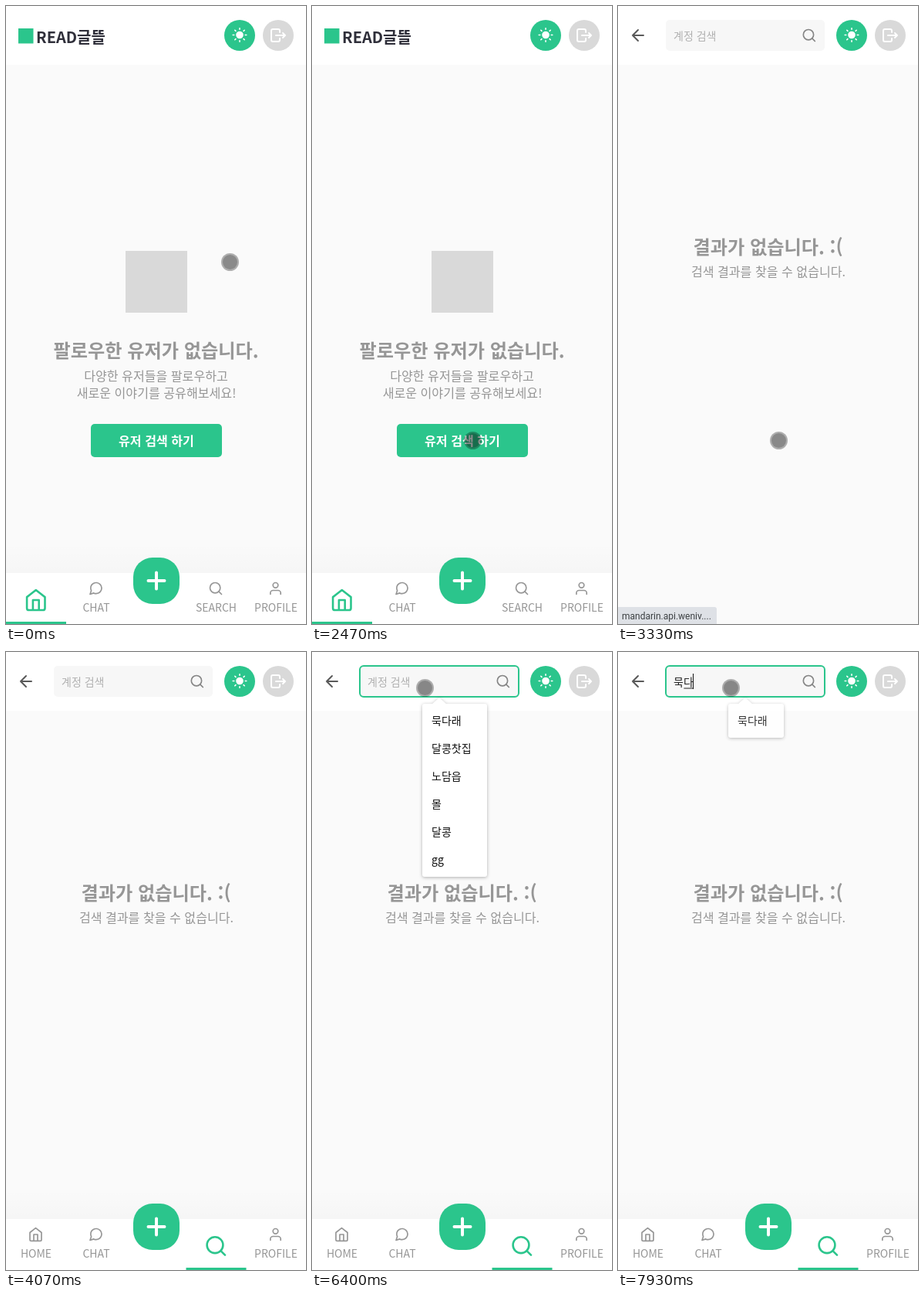
Write an HTML page that moves like this. It is 389 px wide and 800 px high and loops after 8 s.

```html
<!DOCTYPE html>
<html lang="ko">
<head>
<meta charset="utf-8">
<title>Account search</title>
<style>
  html, body { margin: 0; width: 100%; height: 100%; overflow: hidden; background: #fafafa; }
  svg { display: block; width: 100vw; height: 100vh; }
  text { font-family: "Noto Sans CJK KR", "Noto Sans KR", "Noto Sans CJK JP", "Noto Sans CJK", "Noto Sans", sans-serif; white-space: pre; }
  .mid { text-anchor: middle; }
  .icon { fill: none; stroke-width: 2; stroke-linecap: round; stroke-linejoin: round; }
  .title { font-size: 24.2px; font-weight: 700; fill: #969696; }
  .body { font-size: 16.1px; fill: #969696; }
  .label { font-size: 14px; fill: #969696; }
  .item { font-size: 14px; font-weight: 300; fill: #111; }
  .status { font: 12px Roboto, "Open Sans", sans-serif; fill: #3c4043; }
  .popup { filter: drop-shadow(0 1px 2px rgba(0, 0, 0, .3)); }
</style>
</head>
<body>
<svg id="stage" viewBox="0 0 389 800"></svg>
<script>
const LOOP = 8000;
const GREEN = '#2bc58c', GREY = '#969696', PALE = '#d9d9d9';

const paths = {
  home: '<path d="M3 9l9-7 9 7v11a2 2 0 0 1-2 2H5a2 2 0 0 1-2-2zM9 22V12h6v10"/>',
  chat: '<path d="M21 11.5a8.4 8.4 0 0 1-.9 3.8 8.5 8.5 0 0 1-7.6 4.7 8.4 8.4 0 0 1-3.8-.9L3 21l1.9-5.7a8.4 8.4 0 0 1-.9-3.8 8.5 8.5 0 0 1 4.7-7.6 8.4 8.4 0 0 1 3.8-.9h.5a8.5 8.5 0 0 1 8 8z"/>',
  search: '<circle cx="11" cy="11" r="8"/><path d="M21 21l-4.35-4.35"/>',
  user: '<path d="M20 21v-2a4 4 0 0 0-4-4H8a4 4 0 0 0-4 4v2"/><circle cx="12" cy="7" r="4"/>',
  back: '<path d="M19 12H5M12 19l-7-7 7-7"/>',
  exit: '<path d="M14 8V6a2 2 0 0 0-2-2H5a2 2 0 0 0-2 2v12a2 2 0 0 0 2 2h7a2 2 0 0 0 2-2v-2M9 12h12l-3-3m0 6l3-3"/>'
};

const group = (id, body, attrs = '') => `<g id="${id}" ${attrs}>${body}</g>`;
const rect = (x, y, w, h, fill, attrs = '') =>
  `<rect x="${x}" y="${y}" width="${w}" height="${h}" fill="${fill}" ${attrs}/>`;
const text = (x, y, cls, str, attrs = '') => `<text x="${x}" y="${y}" class="${cls}" ${attrs}>${str}</text>`;
// Icons are drawn in a 24-unit box centred on (x, y).
const icon = (name, x, y, scale, color) =>
  `<g class="icon" stroke="${color}" transform="translate(${x} ${y}) scale(${scale}) translate(-12 -12)">${paths[name]}</g>`;

const TABS = [['home', 'HOME', 39], ['chat', 'CHAT', 117], ['search', 'SEARCH', 272.5], ['user', 'PROFILE', 350]];

function tab([name, label, x], active) {
  if (!active) return icon(name, x - .5, 754, .833, GREY) + text(x, 784, 'label mid', label);
  return icon(name, x - .2, 769, 1.3, GREEN) + rect(x - 39, 797, 78, 3, GREEN);
}

const tabs = current => TABS.map(t => tab(t, t[0] === current)).join('');

const rays = [...Array(8).keys()].map(i =>
  `<path d="M0-7.2v-1.6" transform="rotate(${i * 45})"/>`).join('');

const headerButtons = `
  <circle cx="303" cy="38" r="20" fill="${GREEN}"/>
  <g transform="translate(303 37.5)" stroke="#fff" stroke-width="1.6" stroke-linecap="round">
    <circle r="4.8" fill="#fff" stroke="none"/>${rays}
  </g>
  <circle cx="353" cy="38" r="20" fill="${PALE}"/>` + icon('exit', 353, 38, 1, '#fff');

const homePage =
  rect(16, 29, 19.5, 19.5, GREEN) +
  text(39, 48, '', 'READ글뜰', 'font-size="20" font-weight="900" fill="#2f2f3a"') +
  rect(155, 317, 80, 80, PALE) +
  text(194.5, 455, 'title mid', '팔로우한 유저가 없습니다.') +
  text(194.5, 485, 'body mid', '다양한 유저들을 팔로우하고') +
  text(195, 507, 'body mid', '새로운 이야기를 공유해보세요!') +
  rect(110, 541, 170, 43, GREEN, 'rx="5"') +
  text(195, 569, 'mid', '유저 검색 하기', 'font-size="16.1" font-weight="700" fill="#fff"') +
  rect(110, 541, 170, 43, 'rgba(51,181,229,.4)', 'id="tap" rx="5"');

const searchPage =
  icon('back', 26, 38, 1, '#5a5a5a') +
  rect(62, 18, 206, 40, '#f7f7f7', 'rx="5"') +
  rect(62, 18, 206, 40, 'none', `id="focus" rx="5" stroke="${GREEN}" stroke-width="2"`) +
  text(72, 44, '', '계정 검색', 'id="hint" font-size="14" fill="#b0b0b0"') +
  text(72, 44, '', '', 'id="typed" font-size="14" fill="#222"') +
  rect(0, 46.5, 12, 1, '#222', 'id="underline"') +
  rect(0, 28, 1, 20, '#111', 'id="caret"') +
  icon('search', 247.8, 38, .833, '#858585') +
  text(194.5, 321, 'title mid', '결과가 없습니다. :(') +
  text(195, 350, 'body mid', '검색 결과를 찾을 수 없습니다.');

function popup(id, width, height, items) {
  const body = `<path d="M155 68l10-9 10 9z" fill="#fff"/>` + rect(143, 67, width, height, '#fff', 'rx="3"') +
    items.map((s, i) => text(155, 94 + i * 36, 'item', s)).join('');
  return group(id, body, 'class="popup"');
}

document.getElementById('stage').innerHTML = `
  <defs><linearGradient id="shade" x2="0" y2="1">
    <stop offset="0" stop-opacity="0"/><stop offset="1" stop-opacity=".018"/>
  </linearGradient></defs>` +
  rect(0, 0, 389, 800, '#fafafa') +
  rect(0, 0, 389, 76, '#fff') +
  group('homePage', homePage) +
  group('searchPage', searchPage) +
  headerButtons +
  group('nav',
    rect(0, 696, 389, 38, 'url(#shade)') + rect(0, 734, 389, 66, '#fff') +
    group('homeTabs', tabs('home')) + group('searchTabs', tabs('search')) +
    rect(165, 714, 60, 60, GREEN, 'rx="25"') +
    '<path d="M184.5 744h21M195 733.5v21" stroke="#fff" stroke-width="4" stroke-linecap="round"/>') +
  group('status',
    '<path d="M0 778h125q3 0 3 3v19H0z" fill="#dee1e6"/>' + text(5, 794, 'status', 'mandarin.api.weniv....')) +
  popup('allItems', 84, 224, ['묵다래', '달콩찻집', '노담읍', '몰', '달콩', 'gg']) +
  popup('oneItem', 72, 44, ['묵다래']) +
  group('cursor', '<circle r="11.5" fill-opacity=".3"/><circle r="9.5" fill-opacity=".21"/>');

// Each track holds [start ms, value]; the value stays until the next start.
const fades = {
  homePage: [[0, 1], [3330, 0]],
  homeTabs: [[0, 1], [3330, 0]],
  searchPage: [[0, 0], [3330, 1]],
  searchTabs: [[0, 0], [3530, 1]],
  nav: [[0, 1], [3330, 0], [3530, 1]],
  tap: [[0, 0], [3070, 1]],
  status: [[0, 0], [3130, .5], [3200, 1], [3600, .5], [3670, 0]],
  focus: [[0, 0], [5670, .3], [5730, .6], [5800, .85], [5870, 1]],
  caret: [[0, 0], [5870, 1], [6400, 0], [6930, 1]],
  hint: [[0, 1], [7130, 0]],
  underline: [[0, 0], [7130, 1]],
  allItems: [[0, 0], [6130, 1], [7200, .5], [7270, 0]],
  oneItem: [[0, 0], [7530, .8], [7600, 1], [7730, 0], [7930, .85]]
};
const typing = [[0, ''], [7130, 'ㅁ'], [7330, '무'], [7470, '묵'], [7670, '묵ㄷ'], [7870, '묵다']];
const cursorPath = [
  [0, [290.5, 331.5]], [870, null], [2470, [208.5, 562.5]], [4070, null],
  [4200, [203.5, 535.5]], [4270, null],
  [4600, [173.5, 398.5]], [4670, [170, 350]], [4730, [166.5, 296]],
  [4800, [163, 240]], [4930, [159.5, 184.5]], [5000, null],
  [5600, [146.5, 46.5]]
];

const at = (track, t) => track.reduce((value, [start, next]) => t >= start ? next : value, null);
const el = id => document.getElementById(id);

function draw(t) {
  for (const id in fades) el(id).setAttribute('opacity', at(fades[id], t));

  const word = at(typing, t);
  const end = 72 + word.length * 12.9;
  el('typed').textContent = word;
  el('caret').setAttribute('x', word ? Math.floor(end) : 72);
  el('underline').setAttribute('x', end - 12.4);

  const spot = at(cursorPath, t);
  el('cursor').setAttribute('opacity', spot ? 1 : 0);
  if (spot) el('cursor').setAttribute('transform', `translate(${spot})`);
}

const begin = performance.now();
function tick() {
  draw((performance.now() - begin) % LOOP);
  requestAnimationFrame(tick);
}
tick();
</script>
</body>
</html>
```
